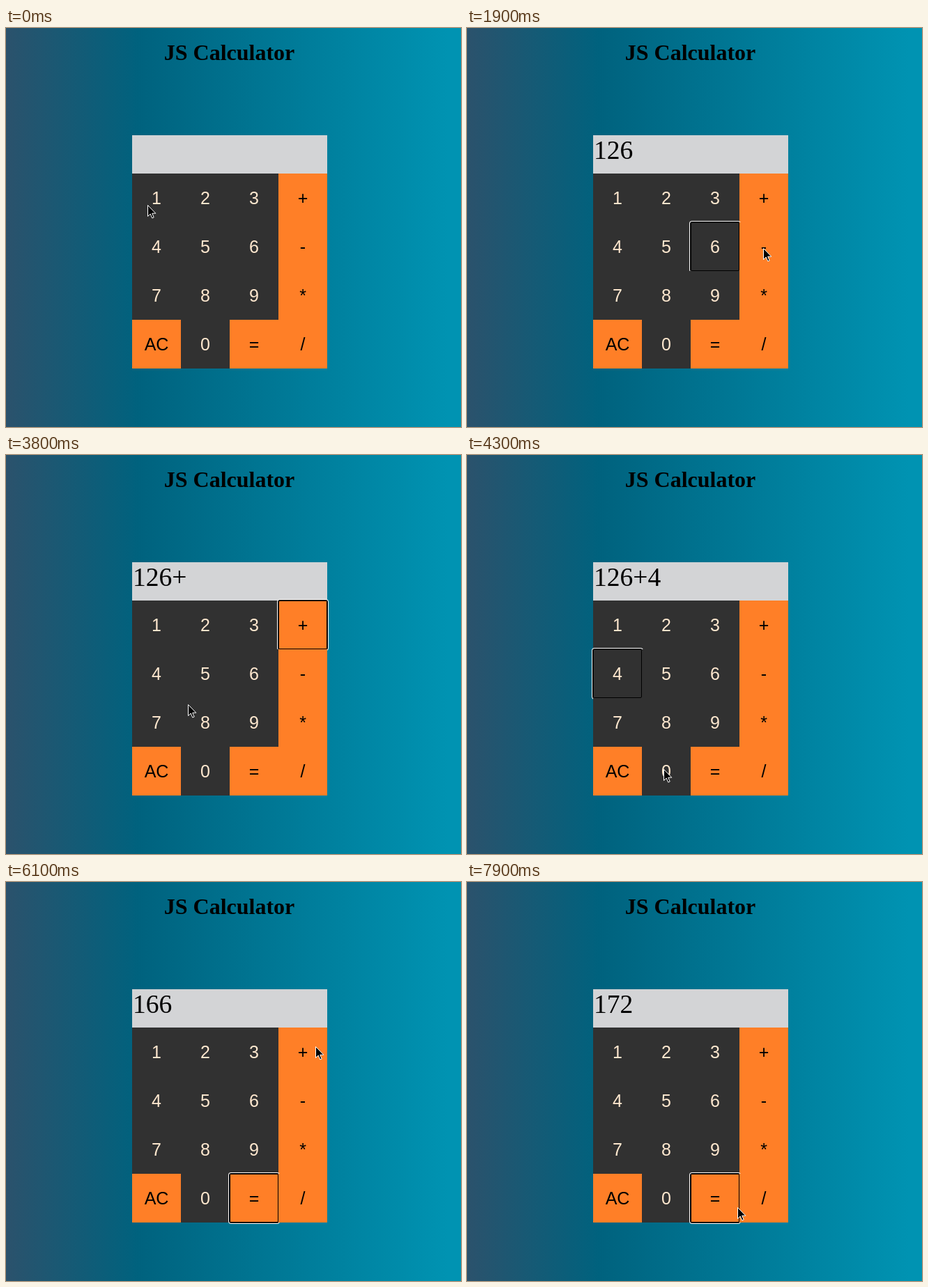
Recreate the animation shown at these times as an HTML page. Size 653 px wide and 573 px high, loop 8000 ms.

```html
<!DOCTYPE html>
<html lang="en">
<head>
<meta charset="utf-8">
<title>JS Calculator</title>
<style>
  html, body { margin: 0; width: 100%; height: 100%; overflow: hidden; }
  body {
    position: relative;
    background: linear-gradient(to right, #2b526c, #00627e 29%, #0093b2 97%);
  }
  h1 {
    position: absolute; left: 0; top: 17px; width: 641px; margin: 0;
    font: bold 32px/36px "Liberation Serif", serif; text-align: center;
  }
  #calc { position: absolute; left: 181px; top: 154px; width: 280px; }
  #display {
    height: 55px; background: #d3d4d6; white-space: pre;
    font: 37.5px/44px "Liberation Serif", serif; text-indent: 1px;
  }
  #keys { display: grid; grid-template-columns: repeat(4, 70px); grid-auto-rows: 70px; }
  .key {
    position: relative; background: #ff7f27; color: #000;
    font: 25px/70px "Liberation Sans", sans-serif; text-align: center;
  }
  .digit { background: #313131; color: #ffe8cf; }
  /* Later keys paint over the outer part of the ring. */
  .focus::after {
    content: ""; position: absolute; inset: 0; border-radius: 2px;
    box-shadow: inset 0 0 0 1px #000, 0 0 0 1px #000, 0 0 0 2px #fff;
  }
  #cursor { position: absolute; left: 0; top: 0; overflow: visible; }
</style>
</head>
<body>
<h1>JS Calculator</h1>
<div id="calc">
  <div id="display"></div>
  <div id="keys"></div>
</div>
<svg id="cursor" width="13" height="21">
  <path d="M.5 1.5V17.5L4.2 14L6.8 20L9.2 19L6.7 13.2H11.8Z" fill="#000" stroke="#fff"/>
</svg>
<script>
const LOOP = 8000, STEP = 100, TRAVEL = 300;
const KEY_SIZE = 70, FIRST_CENTER = { x: 216, y: 244 };
const labels = ["1", "2", "3", "+", "4", "5", "6", "-", "7", "8", "9", "*", "AC", "0", "=", "/"];
const display = document.getElementById("display");
const keypad = document.getElementById("keys");
const cursor = document.getElementById("cursor");

const keys = labels.map(label => {
  const key = document.createElement("div");
  key.className = /\d/.test(label) ? "key digit" : "key";
  key.textContent = label;
  keypad.append(key);
  return key;
});

// "=" takes the focus when pressed and evaluates when released.
const presses = [
  [300, "1"], [800, "2"], [1400, "6"], [2300, "+"], [4000, "4"], [4400, "0"],
  [4900, "="], [5200, "release"],
  [6300, "+"], [6700, "6"], [7100, "="], [7700, "release"]
];

// The pointer reaches a key at a time, optionally off its centre.
const stops = [
  stop(0, "1", -13, 9), stop(100, "1", -21, 10), stop(800, "2", -8), stop(1400, "6", 9),
  stop(1700, "/", 21, 17), stop(1900, "-", -1, 1), stop(2300, "+"),
  stop(2500, "0", 24, 17), stop(2600, "8", 2, -5), stop(4000, "4", -9),
  stop(4300, "0", -4, -4), stop(4900, "=", 7, -3), stop(5800, "/", 21, 17),
  stop(6100, "+", 18, -9), stop(6700, "6", 12, 4), stop(7100, "=", 9, -28),
  stop(7300, "=", 3, 7), stop(7800, "/", 6, 19), stop(7900, "=", 32, 12)
];

function stop(time, label, dx = 0, dy = 0) {
  const i = labels.indexOf(label);
  return {
    time,
    x: FIRST_CENTER.x + KEY_SIZE * (i % 4) + dx,
    y: FIRST_CENTER.y + KEY_SIZE * Math.floor(i / 4) + dy
  };
}

function calculatorAt(t) {
  let text = "", focused = "";
  for (const [time, key] of presses) {
    if (time > t) break;
    if (key === "release") {
      text = String(text.split("+").reduce((sum, n) => sum + Number(n), 0));
      continue;
    }
    focused = key;
    if (key !== "=") text += key;
  }
  return { text, focused };
}

function pointerAt(t) {
  const i = stops.findLastIndex(s => s.time <= t);
  const from = stops[i], to = stops[i + 1] || from;
  const start = Math.max(from.time, to.time - TRAVEL);
  const k = t > start ? (t - start) / (to.time - start) : 0;
  const mix = (a, b) => Math.round(a + (b - a) * k);
  return { x: mix(from.x, to.x), y: mix(from.y, to.y) };
}

let shown = -1;
function draw(t) {
  if (t === shown) return;
  shown = t;
  const { text, focused } = calculatorAt(t);
  const { x, y } = pointerAt(t);
  display.textContent = text;
  keys.forEach((key, i) => key.classList.toggle("focus", labels[i] === focused));
  cursor.style.transform = `translate(${x}px, ${y}px)`;
}

const origin = performance.now();
function tick() {
  const elapsed = (performance.now() - origin) % LOOP;
  draw(Math.floor(elapsed / STEP) * STEP);
  requestAnimationFrame(tick);
}
tick();
</script>
</body>
</html>
```
